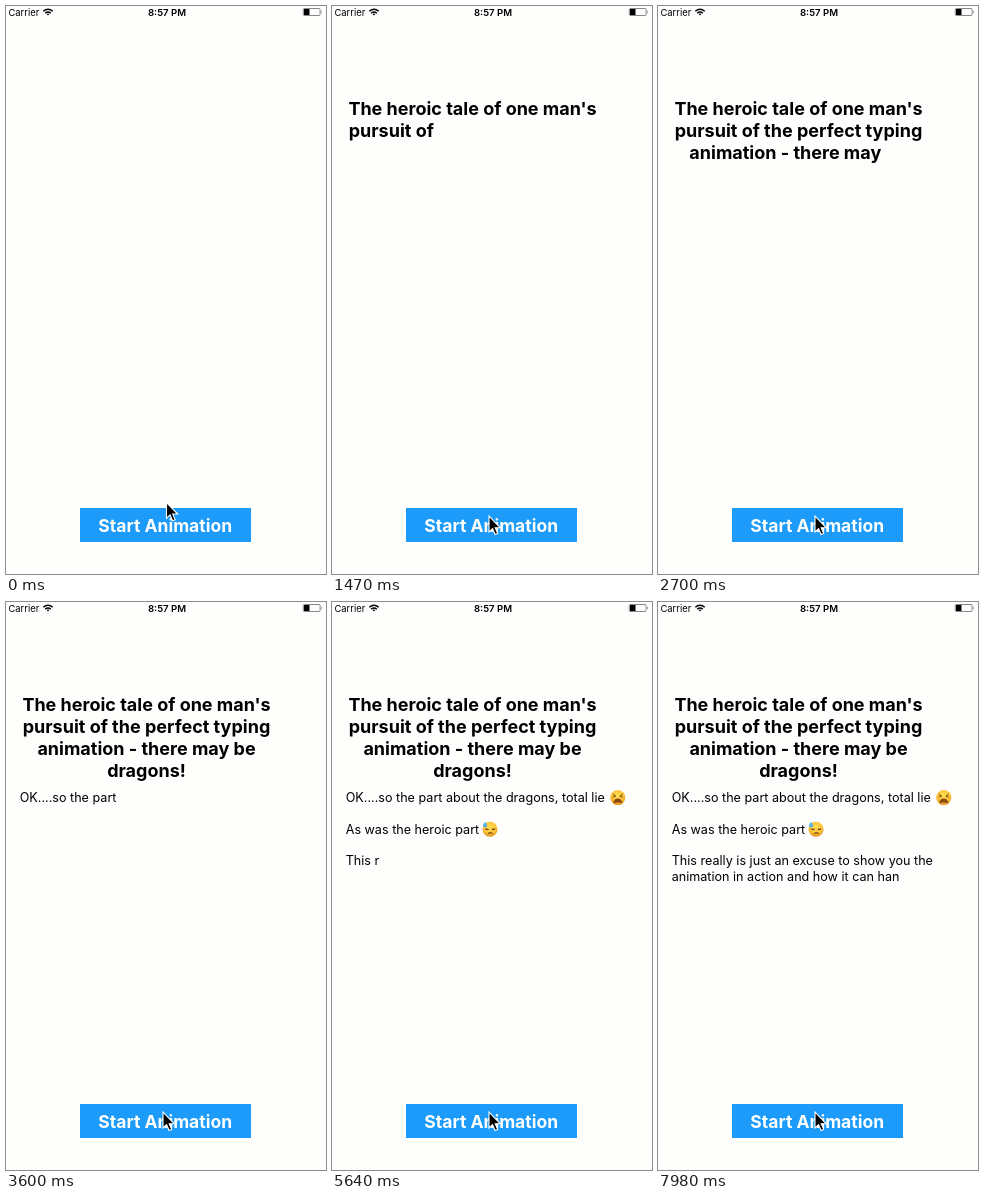
Recreate the animation shown at these times as an HTML page. Size 320x568 px, loop 8 s.

```html
<!DOCTYPE html>
<html lang="en">
<head>
<meta charset="utf-8">
<title>Typing animation</title>
<style>
  html, body { margin: 0; width: 100%; height: 100%; overflow: hidden; background: #fefefd; }
  svg { display: block; width: 320px; height: 568px; }
  text { font-family: Inter, Roboto, sans-serif; white-space: pre; }
  .title { font-size: 18px; font-weight: 700; text-anchor: middle; }
  .body { font-size: 12.6px; }
  .button { font-size: 17.5px; font-weight: 700; text-anchor: middle; fill: #fff; }
  .carrier { font-size: 9.4px; }
  .clock { font-size: 9.6px; font-weight: 600; text-anchor: middle; }
  .rest { visibility: hidden; }
</style>
</head>
<body>
<svg viewBox="0 0 320 568">
  <defs>
    <radialGradient id="skin" cx=".5" cy=".35" r=".65">
      <stop offset="0" stop-color="#ffdf55"/>
      <stop offset=".7" stop-color="#fbbd32"/>
      <stop offset="1" stop-color="#dd8a1c"/>
    </radialGradient>
    <g id="missing">
      <rect width="14" height="13.5" rx="1"/>
      <rect x="3.5" y="2" width="6.5" height="9.5" fill="#fff"/>
      <path d="M4.7 10.5 8 3.5V10.5M5.5 8H8" fill="none" stroke="#000"/>
    </g>
  </defs>

  <text class="carrier" x="2.5" y="9.5">Carrier</text>
  <g fill="none" stroke="#000" stroke-width="1.5">
    <path d="M37.3 5.3Q42 1.1 46.7 5.3M39.2 7.2Q42 4.7 44.8 7.2"/>
    <path d="M40.6 8.1Q42 7 43.4 8.1L42 9.6Z" fill="#000" stroke="none"/>
  </g>
  <text class="clock" x="161" y="9.5">8:57 PM</text>
  <rect x="297.3" y="2.5" width="16.8" height="7" rx="1" fill="none" stroke="#555" stroke-width=".7"/>
  <rect x="298" y="3" width="5.5" height="6"/>
  <path d="M315 4.6Q316.4 6 315 7.4Z" fill="#555"/>

  <g id="lines"></g>

  <use id="missingWeary" href="#missing" x="14" y="205.7"/>
  <use id="missingSweat" href="#missing" x="150.5" y="220.5"/>
  <g id="weary" transform="translate(285.8 195.6)">
    <circle r="7.5" fill="url(#skin)"/>
    <path d="M-5-3.4-2-1.5-5.2-.4M5-3.4 2-1.5 5.2-.4" fill="none" stroke="#74430f" stroke-width=".9"/>
    <path d="M-4.4 5.4Q-4 .8 0 .8T4.4 5.4Q0 4.2-4.4 5.4Z" fill="#8a4a14"/>
  </g>
  <g id="sweat" transform="translate(158 227.2)">
    <circle r="7.5" fill="url(#skin)"/>
    <path d="M-4.6-.6Q-3.2 1-1.5-.2M1.8-.2Q3.5 1 5-.6M-2 4.4Q.4 2.7 2.7 4.4" fill="none" stroke="#5b3510" stroke-width="1.1"/>
    <path d="M-4.9-7.3Q-1.8-4.3-3.2-2.4Q-5-.8-6.8-2.4Q-8-4.2-4.9-7.3Z" fill="#58b4e4"/>
  </g>

  <rect x="74" y="502" width="171" height="34" fill="#1c9bfa"/>
  <text class="button" x="159.2" y="525.6">Start Animation</text>
  <path id="cursor" d="M0 0V15.8L3.6 12.4 6.1 18.3 8.7 17.2 6.2 11.5H11.2Z" stroke="#fff" stroke-width="1.1"/>
</svg>
<script>
const LOOP = 8000, STEP = 30, TITLE_START = 300, BODY_START = 3090;
const WEARY_AT = 48, SWEAT_AT = 76;
const byId = id => document.getElementById(id);

// Each line: class, x, baseline, characters typed before it, text
const lines = [
  ["title", 140.5, 108.6, 0, "The heroic tale of one man's"],
  ["title", 140.5, 130.7, 29, "pursuit of the perfect typing"],
  ["title", 140.5, 152.8, 59, "animation - there may be"],
  ["title", 140.5, 174.9, 84, "dragons!"],
  ["body", 13.7, 200, 0, "OK....so the part about the dragons, total lie"],
  ["body", 13.7, 231.5, 52, "As was the heroic part"],
  ["body", 13.7, 263, 79, "This really is just an excuse to show you the"],
  ["body", 13.7, 278.7, 125, "animation in action and how it can handle"]
].map(([kind, x, y, offset, text]) => {
  const add = (parent, tag, attrs) => {
    const node = document.createElementNS("http://www.w3.org/2000/svg", tag);
    for (const key in attrs) node.setAttribute(key, attrs[key]);
    return parent.appendChild(node);
  };
  const row = add(byId("lines"), "text", { class: kind, x, y });
  return { kind, offset, text, typed: add(row, "tspan", {}), rest: add(row, "tspan", { class: "rest" }) };
});

const show = (id, on) => byId(id).setAttribute("visibility", on ? "visible" : "hidden");
const countAt = (t, start) => Math.max(0, Math.floor((t - start) / STEP + 0.001));

function render(t) {
  const count = { title: countAt(t, TITLE_START), body: countAt(t, BODY_START) };
  for (const { kind, offset, text, typed, rest } of lines) {
    const n = Math.max(0, count[kind] - offset);
    typed.textContent = text.slice(0, n);
    rest.textContent = text.slice(n);
  }

  // An emoji takes two steps; its first half is a missing glyph
  show("missingWeary", count.body === WEARY_AT);
  show("weary", count.body > WEARY_AT);
  show("missingSweat", count.body === SWEAT_AT);
  show("sweat", count.body > SWEAT_AT);

  const p = Math.min(1, Math.max(0, (t - 30) / 180));
  const ease = p * p * (3 - 2 * p);
  byId("cursor").setAttribute("transform", `translate(${160.5 - 3.5 * ease} ${496.5 + 13.7 * ease})`);
}

const start = performance.now();
function tick() {
  render((performance.now() - start) % LOOP);
  requestAnimationFrame(tick);
}
tick();
</script>
</body>
</html>
```
